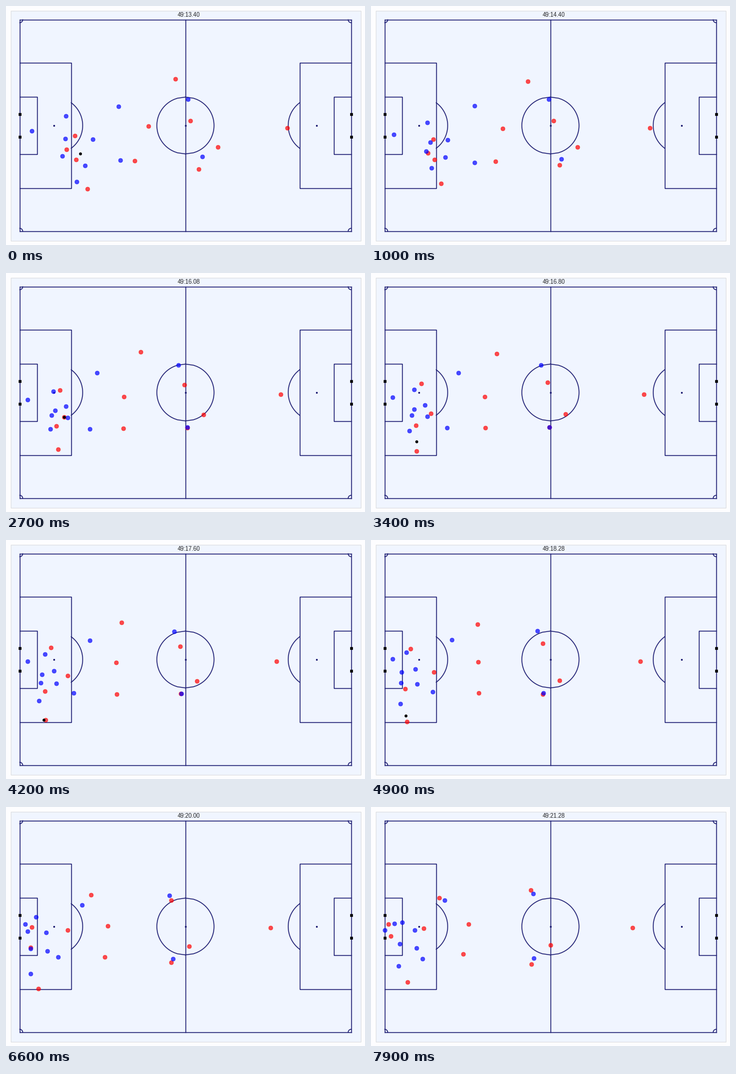
These frames come from a looping animation (600 px wide and 400 px high, 8 s). A matplotlib script:

```python
import numpy as np
import matplotlib.pyplot as plt
from matplotlib.animation import FuncAnimation
from matplotlib.patches import Rectangle

FRAMES, STEP = 80, 0.1
YARD = 0.9144
HALF_L, HALF_W = 53, 34
MARGIN = 3
PAD = 7.5
LINE = "midnightblue"

plt.rcParams["font.family"] = "Liberation Sans"
fig = plt.figure(figsize=(12, 8), dpi=50, facecolor="#fdfdff")
ax = fig.add_axes([0, 0, 1, 1])
ax.set(xlim=(0, 600), ylim=(400, 0))
ax.axis("off")


def to_px(x, y):
    """Pitch metres, origin at the centre spot, to stage pixels."""
    scale_x = (300 - PAD) / (HALF_L + MARGIN)
    scale_y = (200 - PAD) / (HALF_W + MARGIN)
    return 299.9 + scale_x * np.asarray(x), 200 - scale_y * np.asarray(y)


def line(x, y):
    ax.plot(*to_px(x, y), color=LINE, lw=2)


def spot(x):
    ax.scatter(*to_px(x, 0), s=20, color=LINE, linewidth=0)


def arc(radius, y):
    return np.sqrt(np.maximum(radius**2 - y**2, 0))


def draw_pitch():
    ax.add_patch(Rectangle((PAD, PAD), 600 - 2 * PAD, 400 - 2 * PAD,
                           fc="#f0f5ff", ec="lightgray", lw=1))
    unit = np.linspace(-1, 1, 50)
    radius = 10 * YARD
    circle_y, d_y = unit * radius, unit * 8 * YARD
    corner_y = np.linspace(0, 1, 50) * YARD
    line([0, 0], [-HALF_W, HALF_W])
    spot(0)
    for s in (-1, 1):
        end = s * HALF_L
        line(s * arc(radius, circle_y), circle_y)
        line([-HALF_L, HALF_L], [s * HALF_W] * 2)
        line([end, end], [-HALF_W, HALF_W])
        for depth, half in ((18 * YARD, 22 * YARD), (6 * YARD, 10 * YARD)):
            inner = end - s * depth
            line([end, inner, inner, end], [half, half, -half, -half])
        line(end - s * (12 * YARD + arc(radius, d_y)), d_y)
        spot(end - s * 12 * YARD)
        for side in (-1, 1):
            line(end - s * arc(YARD, corner_y), side * (HALF_W - corner_y))
        ax.plot(*to_px([end, end], [-4 * YARD, 4 * YARD]), "ks", ms=6)


def run(*points):
    """Smooth run through waypoints evenly spaced in time."""
    u = np.linspace(0, 1, len(points))
    curves = np.polyfit(u, np.array(points, float), len(points) - 1)
    return np.array([np.polyval(c, np.linspace(0, 1, FRAMES)) for c in curves.T])


reds = [
    run((283, 122), (114, 152)),
    run((308, 192), (292, 180), (267, 139)),
    run((238, 201), (198, 207), (177, 203), (163, 196)),
    run((354, 236), (321, 236), (300, 231)),
    run((322, 273), (303, 259), (285, 258), (268, 263)),
    run((215, 259), (187, 258), (154, 246)),
    run((136, 306), (88, 295), (57, 305), (61, 293)),
    run((117, 257), (85, 256), (53, 247), (33, 216)),
    run((101, 240), (97, 241), (106, 217), (88, 203)),
    run((115, 217), (96, 209), (78, 181), (52, 193), (29, 196)),
    run((470, 204), (437, 202)),
]
blues = [
    run((43, 209), (36, 212), (36, 197), (23, 206)),
    run((100, 184), (80, 198), (56, 186), (52, 193)),
    run((99, 222), (83, 230), (46, 219), (39, 195)),
    run((94, 251), (77, 238), (47, 239), (48, 229)),
    run((118, 294), (75, 261), (46, 276), (46, 266)),
    run((132, 267), (104, 242), (74, 241), (76, 236)),
    run((145, 223), (101, 223), (71, 215), (73, 206)),
    run((188, 168), (153, 167), (133, 167), (123, 156)),
    run((191, 258), (141, 261), (98, 253), (86, 254)),
    run((304, 156), (282, 153), (271, 145)),
    run((328, 252), (304, 258), (286, 256), (272, 253)),
]


def ball_at(t):
    """Pass to the wing, cross and header; untracked early on and once dead."""
    if 0.45 < t < 1.95 or t > 6.45:
        return np.nan, np.nan
    keys = [0, 2, 2.7, 3.7, 4.8, 5.7, 6, 6.4]
    return (np.interp(t, keys, [124, 97, 97, 67, 59, 53, 50, 22]),
            np.interp(t, keys, [247, 241, 241, 299, 303, 220, 193, 203]))


draw_pitch()
teams = []
for color, squad in (("red", reds), ("blue", blues)):
    dots, = ax.plot([], [], "o", color=color, ms=10, alpha=0.7)
    teams.append((dots, np.array(squad)))
ball, = ax.plot([], [], "ko", ms=6)
clock = ax.text(*to_px(-2.5, HALF_W + 1), "", fontsize=14, color="0.15")


def update(k):
    for dots, path in teams:
        dots.set_data(path[:, 0, k], path[:, 1, k])
    x, y = ball_at(k * STEP)
    ball.set_data([x], [y])
    # Tracking runs at 25 Hz, the animation at 10 Hz.
    clock.set_text(f"49:{13.4 + (k * 5 // 2) / 25:.2f}")
    return [dots for dots, _ in teams] + [ball, clock]


anim = FuncAnimation(fig, update, frames=FRAMES, interval=100,
                     repeat=True, repeat_delay=0)
plt.show()
```
